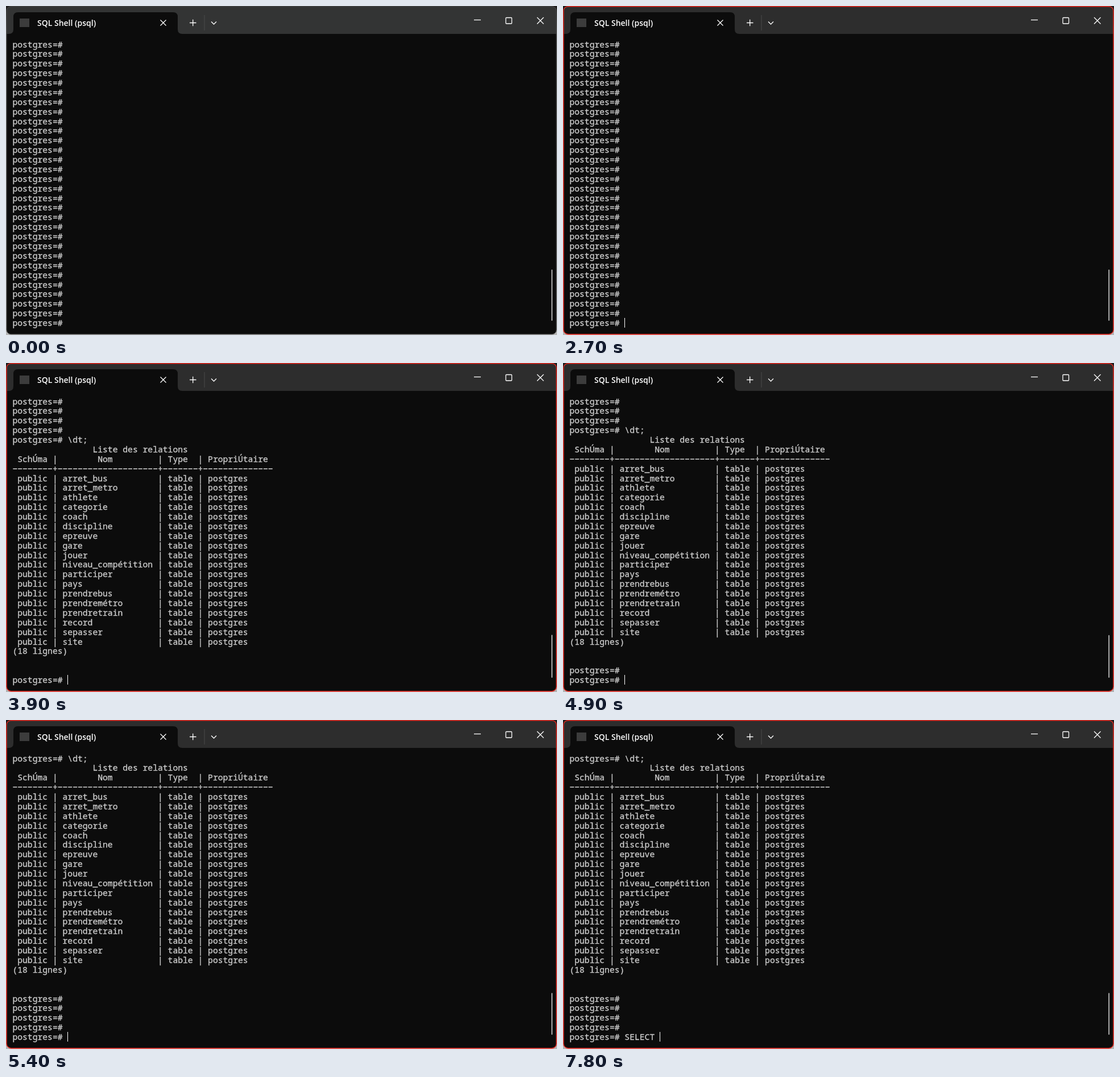
These frames come from a looping animation (969x578 px, 8000 ms). An HTML page:

```html
<!DOCTYPE html>
<html lang="fr">
<head>
<meta charset="utf-8">
<title>SQL Shell</title>
<style>
  html, body { margin: 0; width: 100%; height: 100%; overflow: hidden; background: #222; }
  svg { display: block; width: 969px; height: 578px; }
  .term text {
    font: 14.7px "Noto Sans Mono", "DejaVu Sans Mono", monospace;
    fill: #ccc; stroke: #ccc; stroke-width: .35; white-space: pre;
  }
  .tab { font: 600 14px "Open Sans", "Noto Sans", sans-serif; fill: #fff; }
  .icons { fill: none; stroke: #fff; stroke-width: 1.3; }
</style>
</head>
<body>
<svg viewBox="0 0 969 578">
  <defs>
    <linearGradient id="edge" x2="0" y2="1">
      <stop offset="0" stop-color="#1c1c1c"/>
      <stop offset=".08" stop-color="#777"/>
      <stop offset="1" stop-color="#b4b4b4"/>
    </linearGradient>
  </defs>
  <rect width="969" height="578" fill="url(#edge)"/>
  <rect x="1" y=".7" width="967" height="576" rx="8" fill="#0c0c0c"/>
  <path id="bar" d="M1 49V8.700a8 8 0 0 1 8-8H960a8 8 0 0 1 8 8V49Z"/>
  <path d="M5 49q8 0 8-8V19q0-8 8-8H294q8 0 8 8V41q0 8 8 8Z" fill="#0c0c0c"/>
  <rect id="frame" x="1" y=".7" width="967" height="576" rx="8" fill="none"/>
  <rect x="24" y="22" width="17" height="15" fill="#3c3c3c"/>
  <text class="tab" x="55" y="35">SQL Shell (psql)</text>
  <path d="M349 16V43" stroke="#4a4a4a"/>
  <g class="icons">
    <path d="M271.500 24.500l10 10m0-10l-10 10"/>
    <path d="M323 29.500h11.500M328.700 23.700v11.500"/>
    <path d="M361 27.500l4.500 4.500l4.500-4.500"/>
    <path d="M823 24.500h12"/>
    <rect x="879" y="20.500" width="10.500" height="10.500" rx="1"/>
    <path d="M934 20l11.500 11.500m0-11.500l-11.500 11.500"/>
  </g>
  <g class="term" id="rows"></g>
  <rect id="caret" width="1" height="17" fill="#fff"/>
  <rect id="thumb" x="959" width="2.200" rx="1.100" fill="#9f9f9f"/>
  <path id="mouse" d="M.5 .5V16.500L4.200 13L6.700 18.500L9 17.500L6.600 12.100H11.500Z" fill="#fff" stroke="#000"/>
</svg>
<script>
const LOOP = 8000, ROWS = 30, LEFT = 11.4, CELL = 8.82, LINE = 16.88;
const THUMB_END = 553, THUMB_SIZE = 90, BUFFER = 130;
const PROMPT = "postgres=#";
const $ = id => document.getElementById(id);

const tables = ("arret_bus arret_metro athlete categorie coach discipline epreuve gare jouer " +
  "niveau_compétition participer pays prendrebus prendremétro prendretrain record sepasser site").split(" ");
const listing = [
  " ".repeat(16) + "Liste des relations",
  " SchÚma |        Nom         | Type  | PropriÚtaire",
  [8, 20, 7, 14].map(n => "−".repeat(n)).join("+"),
  ...tables.map(name => ` public | ${name.padEnd(18)} | table | postgres`),
  `(${tables.length} lignes)`, "", ""
];

// Each track lists [start time, value]; a value holds until the next one.
const typed = [[0, ""], [1800, "S"], [1900, "SE"], [2100, "SEL"], [2600, "S"], [2700, ""],
  [3200, "\\"], [3400, "\\dt"], [3500, "\\dt;"], [3800, ""], [6800, "S"], [7000, "SE"],
  [7100, "SEL"], [7200, "SELE"], [7400, "SELEC"], [7600, "SELECT"], [7800, "SELECT "]];
const returns = [[0, 0], [4900, 1], [5000, 2], [5300, 3], [5400, 4]];
const caretOn = [[0, 0], [900, 1], [1400, 0], [1700, 1], [4400, 0], [4900, 1], [5900, 0], [6400, 1]];
const pointer = [[0, null], [200, [117, 182]], [300, [238, 400]], [400, [231, 458]],
  [700, [258, 504]], [1700, null]];
const at = (track, t) => track.findLast(([start]) => start <= t)[1];

const rows = Array.from({ length: ROWS }, (_, i) => {
  const row = document.createElementNS("http://www.w3.org/2000/svg", "text");
  row.setAttribute("x", LEFT);
  row.setAttribute("y", 72.5 + i * LINE);
  return $("rows").appendChild(row);
});

function set(id, attrs) {
  for (const name in attrs) $(id).setAttribute(name, attrs[name]);
}

function screen(t) {
  const lines = Array(ROWS - 1).fill(PROMPT);
  if (t >= 3800) lines.push(PROMPT + " \\dt;");
  if (t >= 3900) lines.push(...listing, ...Array(at(returns, t)).fill(PROMPT));
  const waiting = t >= 3800 && t < 3900;
  lines.push(waiting ? "" : PROMPT + " " + at(typed, t));
  return lines;
}

function draw(t) {
  const lines = screen(t), visible = lines.slice(-ROWS);
  rows.forEach((row, i) => {
    if (row.textContent !== visible[i]) row.textContent = visible[i];
  });
  const focused = t >= 900;
  set("bar", { fill: focused ? "#2d2d2d" : "#333434" });
  set("frame", { stroke: focused ? "#e6241c" : "#4a4a4a", "stroke-width": focused ? 1.4 : 1 });
  set("caret", {
    x: Math.round(LEFT + visible[ROWS - 1].length * CELL), y: 548,
    visibility: at(caretOn, t) ? "visible" : "hidden"
  });
  const height = THUMB_SIZE * BUFFER / (BUFFER + lines.length - ROWS);
  set("thumb", { y: THUMB_END - height, height });
  const spot = at(pointer, t);
  set("mouse", {
    visibility: spot ? "visible" : "hidden",
    transform: `translate(${spot || [0, 0]})`
  });
}

const begin = performance.now();
function tick() {
  draw((performance.now() - begin) % LOOP);
  requestAnimationFrame(tick);
}
tick();
</script>
</body>
</html>
```
